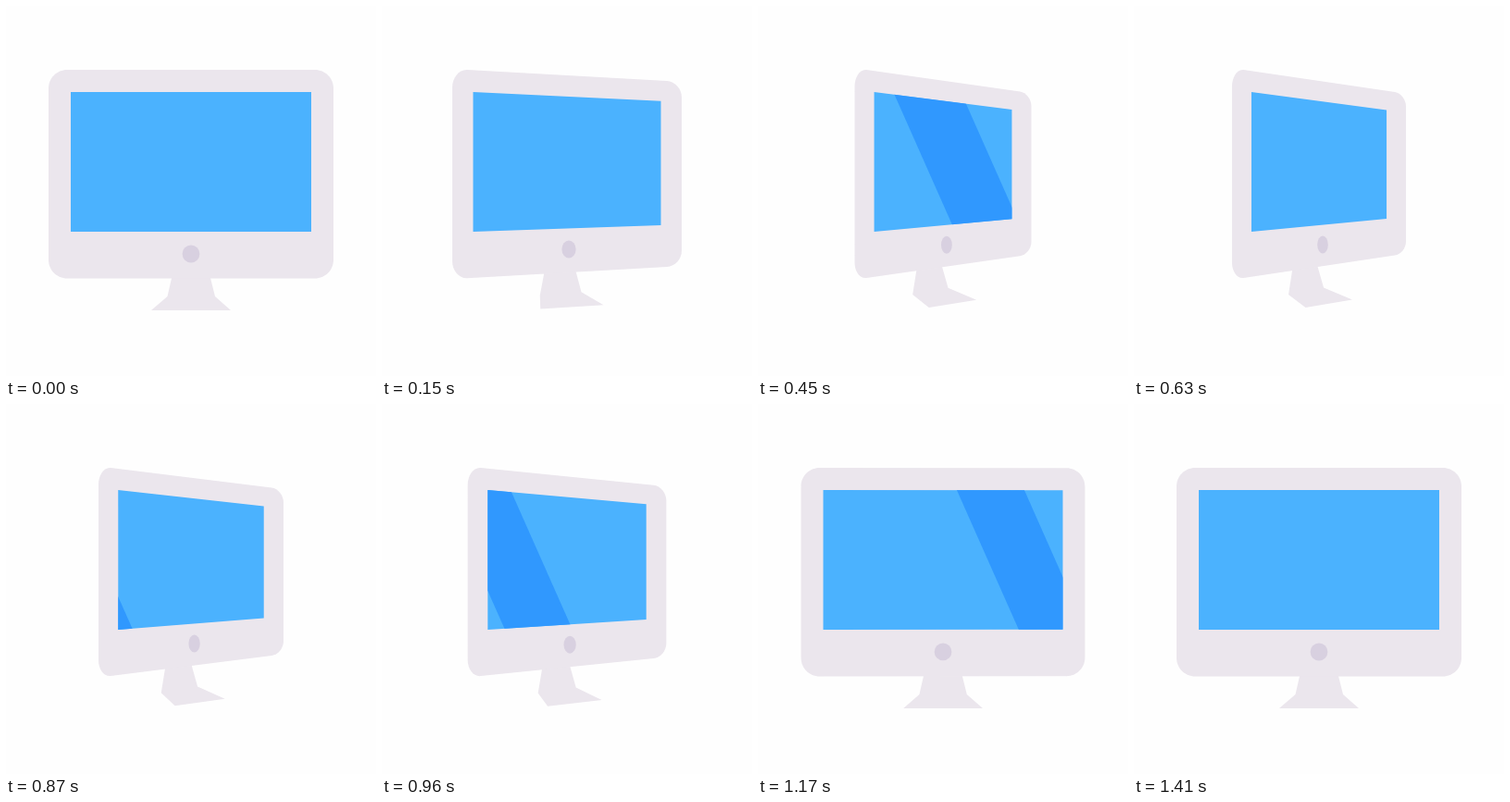
Write an HTML page that moves like this. It is 400 by 400 pixels and loops after 3620 ms.

```html
<!DOCTYPE html>
<html lang="en">
<head>
<meta charset="utf-8">
<title>Turning monitor</title>
<style>
  html, body { margin: 0; height: 100%; overflow: hidden; background: #fefefe; }
  svg { display: block; width: 100vw; height: 100vh; }
</style>
</head>
<body>
<svg viewBox="0 0 400 400">
  <clipPath id="clip"><path id="mask"/></clipPath>
  <path id="stand" fill="#ebe6ed"/>
  <path id="body" fill="#ebe6ed"/>
  <path id="screen" fill="#4bb2fe"/>
  <g clip-path="url(#clip)" fill="#3098fe">
    <path id="shine1"/>
    <path id="shine2"/>
  </g>
  <ellipse id="button" fill="#d8d0e0"/>
</svg>
<script>
const LOOP = 3620, STEP = 30, MOVE_END = 1410, TURN = 600;
const $ = id => document.getElementById(id);

// Each shape: facing front, then fully turned
const shapes = {
  body: [
    'M46 89C46 78 55 69 66 69L334 69C345 69 354 78 354 89L354 274.5C354 285.5 345 294.5 334 294.5L66 294.5C55 294.5 46 285.5 46 274.5Z',
    'M106 87C106 77 111.5 68 118.5 69L282 93C288.5 94 294 101 294 109L294 254C294 262 288.5 268.5 282 269.5L118.5 294C111.5 295 106 287 106 277Z'
  ],
  stand: [
    'M180 290L174.5 314L157 329L243 329L226 314L220 290Z',
    'M172 280L167 312L185.5 326L236 317.5L205 304.5L198 280Z'
  ],
  screen: [
    'M70 93L330 93L330 244L70 244Z',
    'M127 93L273 112.5L273 230L127 244Z'
  ]
};

const lerp = (a, b, p) => a + (b - a) * p;

function morph([from, to], p) {
  const ends = to.match(/[\d.]+/g);
  let i = 0;
  return from.replace(/[\d.]+/g, n => lerp(+n, +ends[i++], p).toFixed(2));
}

// cubic-bezier(1/3, 0, 0, 1)
function ease(x) {
  let lo = 0, hi = 1;
  for (let i = 0; i < 30; i++) {
    const s = (lo + hi) / 2;
    if (s * (1 - s) ** 2 + s ** 3 < x) lo = s; else hi = s;
  }
  return lo * lo * (3 - 2 * lo);
}

// Slanted band gliding left to right with a sine ease
function shine(id, t, mid, span) {
  const a = Math.max(-Math.PI / 2, Math.min(Math.PI / 2, (t - mid) / span));
  const x = 126.5 + 345 * Math.sin(a);
  $(id).setAttribute('d', `M${x - 106.4} 93H${x - 33.4}L${x + 33.6} 244H${x - 39.4}Z`);
}

function draw(t) {
  const p = ease(Math.max(0, 1 - Math.abs(t - TURN) / TURN));
  for (const id in shapes) $(id).setAttribute('d', morph(shapes[id], p));
  $('mask').setAttribute('d', $('screen').getAttribute('d'));
  shine('shine1', t, 289, 430);
  shine('shine2', t, 900, 450);
  const dot = { cx: lerp(200, 204, p), cy: lerp(268, 258, p), rx: lerp(9.4, 5.8, p), ry: 9.4 };
  for (const k in dot) $('button').setAttribute(k, dot[k]);
}

const start = performance.now();
function tick() {
  const t = (performance.now() - start) % LOOP;
  draw(Math.min(MOVE_END, Math.floor(t / STEP) * STEP));
  requestAnimationFrame(tick);
}
tick();
</script>
</body>
</html>
```
